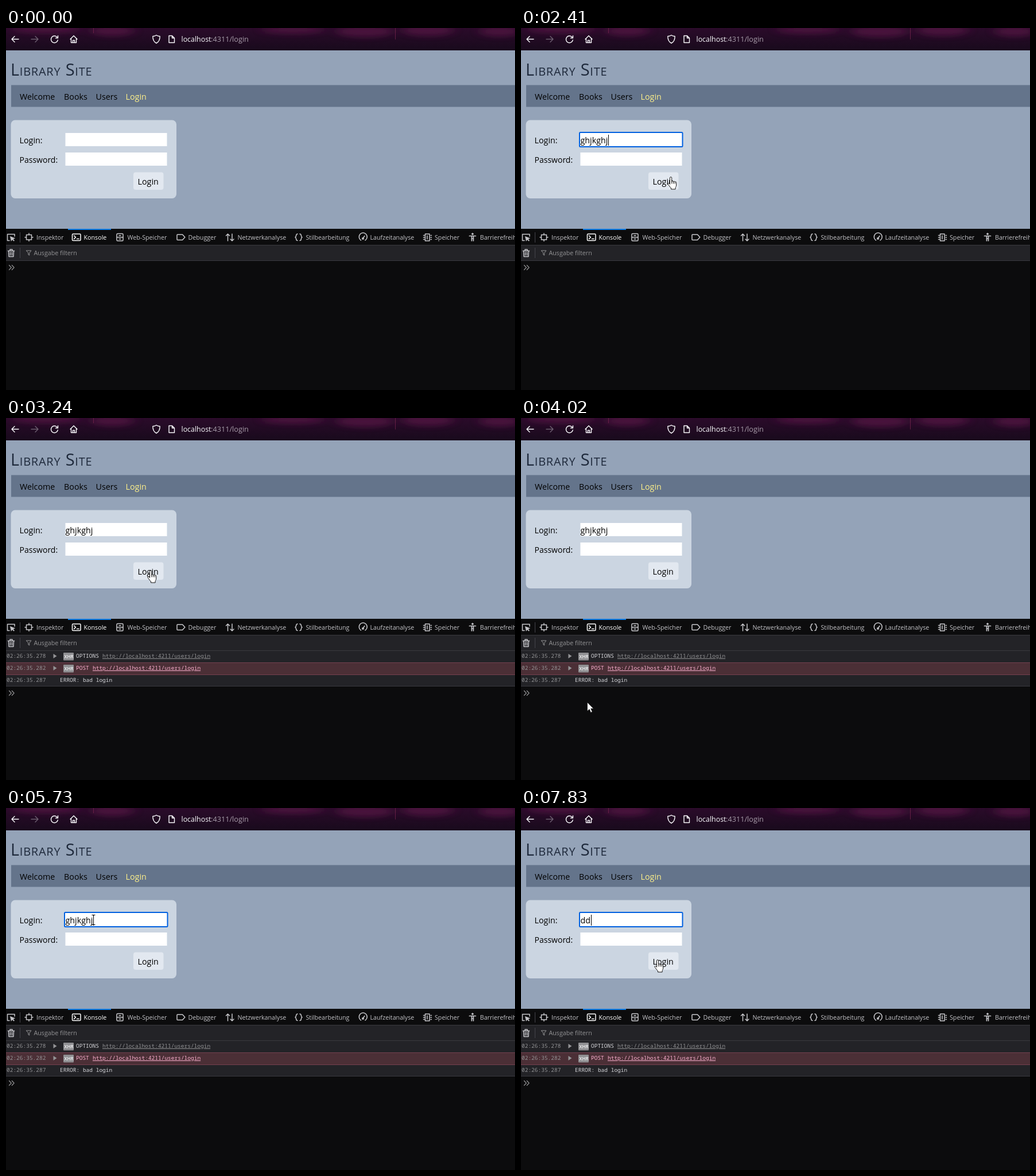
Recreate the animation shown at these times as an HTML page. Size 887x631 px, loop 8 s.

```html
<!DOCTYPE html>
<html lang="de">
<head>
<meta charset="utf-8">
<title>Library Site</title>
<style>
  html, body { margin: 0; width: 100%; height: 100%; overflow: hidden; background: #0c0c0d; }
  svg { display: block; }
  text { white-space: pre; font-family: "Open Sans", "Noto Sans", sans-serif; }
  .page { font-size: 14.3px; }
  .title { font-size: 29px; font-variant: small-caps; letter-spacing: .75px; fill: #1e293b; }
  .url { font-size: 12.4px; fill: #fbfbfe; }
  .tool { font-size: 10.7px; fill: #c4c4c8; }
  .log text { font: 9.5px "Noto Sans Mono", "DejaVu Sans Mono", monospace; fill: #d7d7db; }
  .log .dim { fill: #939395; }
  .log .bad { fill: #ffb3d2; }
  .log .xhr { font: 600 8px "Open Sans", sans-serif; fill: #f2f2f4; }
  .link { text-decoration: underline; }
  .icon { fill: none; stroke: #c8c8cc; stroke-width: 1.5; stroke-linecap: round; stroke-linejoin: round; }
  .nav { fill: none; stroke: #fbfbfe; stroke-width: 1.4; stroke-linecap: round; stroke-linejoin: round; }
</style>
</head>
<body>
<svg width="887" height="631" viewBox="0 0 887 631">
  <defs>
    <linearGradient id="night" x2="0" y2="1">
      <stop offset="0" stop-color="#2b0b2a"/>
      <stop offset="1" stop-color="#180a1c"/>
    </linearGradient>
    <filter id="soft" x="-50%" y="-100%" width="200%" height="300%"><feGaussianBlur stdDeviation="9 5"/></filter>
    <clipPath id="bar"><rect width="887" height="39"/></clipPath>
  </defs>

  <!-- browser bar -->
  <g clip-path="url(#bar)">
    <rect width="887" height="39" fill="url(#night)"/>
    <g filter="url(#soft)" fill="#571344" opacity=".7">
      <ellipse cx="70" cy="2" rx="60" ry="7"/>
      <ellipse cx="185" cy="5" rx="38" ry="9"/>
      <ellipse cx="500" cy="3" rx="55" ry="7"/>
      <ellipse cx="625" cy="6" rx="50" ry="10"/>
      <ellipse cx="735" cy="4" rx="45" ry="10"/>
      <ellipse cx="860" cy="6" rx="35" ry="9"/>
    </g>
    <path d="M152.5 0V9M678.500 0V20" stroke="#8a2c56" opacity=".6"/>
  </g>
  <g class="nav">
    <path d="M22 19.500H10M15 14.500l-5 5 5 5"/>
    <path d="M44 19.500H56M51 14.500l5 5-5 5" stroke="#6d5f70"/>
    <path d="M89.500 16.500A6 6 0 1 0 90.300 21M90.500 13.500V17.500H86.500"/>
    <path d="M112 19.500l6-6 6 6M113.500 18.500V25.500H122.500V18.500M116.500 25.500V21.500h3V25.500"/>
    <path d="M262 12.500c2 1.400 4 1.800 6.200 2 0 5.500-1.200 9.500-6.200 12-5-2.500-6.200-6.500-6.200-12 2.200-.2 4.200-.6 6.200-2z"/>
    <path d="M284 13.500h5.500l4 4V25.500h-9.500zM289.500 13.500v4h4"/>
  </g>
  <text class="url" x="305.500" y="24">localhost</text>
  <text class="url" x="357" y="24" style="fill:#a79ca9;font-size:12.700px">:4311/login</text>

  <!-- page -->
  <rect y="39" width="887" height="312" fill="#94a3b8"/>
  <text class="title" x="8" y="83">Library Site</text>
  <rect x="9" y="99.500" width="878" height="38" fill="#64748b"/>
  <g class="page">
    <text x="24" y="125">Welcome</text>
    <text x="101" y="125">Books</text>
    <text x="156.500" y="125">Users</text>
    <text x="208.500" y="125" fill="#fef08a">Login</text>
    <rect x="8.500" y="160.500" width="288.500" height="136.500" rx="7.500" fill="#cbd5e1"/>
    <text x="23.500" y="201">Login:</text>
    <text x="23.500" y="235" style="font-size:14px">Password:</text>
    <rect x="103.500" y="183" width="177" height="23" fill="#fff"/>
    <rect x="103.500" y="217" width="177" height="23" fill="#fff"/>
    <rect id="ring" x="102" y="182" width="179.500" height="25" rx="1.500" fill="#fff" stroke="#0060df" stroke-width="2"/>
    <rect id="mark" x="103.500" y="185" height="20" fill="#0078d7"/>
    <text id="entry" x="103.500" y="201"></text>
    <rect id="caret" y="186" width="1" height="19"/>
    <rect x="222" y="251.500" width="52.500" height="30.500" rx="4" fill="#e2e8f0"/>
    <text x="229.500" y="273">Login</text>
  </g>

  <!-- developer tools -->
  <rect y="350" width="887" height="281" fill="#0c0c0d"/>
  <rect y="379" width="887" height="26" fill="#232327"/>
  <path d="M0 378.500H887M0 405.500H887" stroke="#3a3a3f"/>
  <path d="M24.500 356V374M24.500 383V401" stroke="#45454a"/>
  <rect x="108" y="350" width="75" height="2" fill="#0a7ce8"/>
  <g class="icon">
    <path d="M6 370.500H2.500V359.500H15V363"/>
    <path d="M7.500 363.500l8 3-3.200 1.300 2.200 2.700-1 .9-2.400-2.700-1.800 2.400z" fill="#c8c8cc" stroke-width=".6"/>
    <path d="M35.500 360.500h9v8.500h-9zM40 358v2M40 369.500v2M33 364.800h2M45 364.800h2"/>
    <path d="M117 359h11.500a1.500 1.500 0 0 1 1.500 1.500v8.500a1.500 1.500 0 0 1-1.500 1.500H117a1.500 1.500 0 0 1-1.500-1.500v-8.500a1.500 1.500 0 0 1 1.500-1.500zM118.500 362l3 2.800-3 2.800M123.500 367.500h3.500" stroke="#fff"/>
    <path d="M194.500 358.500h8a1.500 1.500 0 0 1 1.500 1.500v9.500a1.500 1.500 0 0 1-1.500 1.500h-8a1.500 1.500 0 0 1-1.500-1.500V360a1.500 1.500 0 0 1 1.500-1.500zM193 364.800h11M197 361.700h3M197 367.800h3"/>
    <path d="M299 360h8.500l4.300 4.800-4.300 4.700h-8.500a1 1 0 0 1-1-1v-7.500a1 1 0 0 1 1-1z"/>
    <path d="M386.500 371V359M383.500 362l3-3 3 3M394 359v12M391 368l3 3 3-3"/>
    <path d="M508 359c-4 0-1 5-4 5.800 3 .8 0 5.700 4 5.700M512 359c4 0 1 5 4 5.800-3 .8 0 5.700-4 5.700"/>
    <path d="M618.500 370a7 7 0 1 1 7.500 0M622 366.500l3-4"/>
    <circle cx="622" cy="367" r="1.300"/>
    <path d="M730.500 359h7.500v12h-7.500zM727.500 361.500h1.500M727.500 365h1.500M727.500 368.500h1.500M740 361.500h1.500M740 365h1.500M740 368.500h1.500M734 362v6"/>
    <path d="M807.500 362.500h11M811.500 363v8M814.500 363v8M811.500 367h3" stroke-width="1.700"/>
    <circle cx="813" cy="359" r="1.300" fill="#c8c8cc" stroke-width="1"/>
    <path d="M3.500 388.500H14.500M7 388v-2h4v2M4.500 389l.6 9.500h7.800l.6-9.500M7.500 391v5M10.500 391v5"/>
    <path d="M35.500 388h8.500l-3.300 4.200v4l-1.900-1.200v-2.800z" stroke="#939395" stroke-width="1"/>
    <path id="prompt" d="M5.500 413.500l3.800 4-3.800 4M10.300 413.500l3.800 4-3.800 4" stroke="#939395" stroke-width="1.200"/>
  </g>
  <g id="tabs"></g>
  <text class="tool" x="48.500" y="396" style="fill:#939395">Ausgabe filtern</text>

  <g id="log" class="log">
    <rect y="406" width="887" height="61" fill="#232327"/>
    <rect y="426" width="887" height="21" fill="#4b2f36"/>
    <path d="M0 426.500H887M0 447.500H887" stroke="#74404f"/>
    <path d="M0 467.500H887" stroke="#3a3a3f"/>
    <path d="M82.500 411l6 4-6 4zM82.500 432l6 4-6 4z" fill="#939395"/>
    <rect x="100" y="409" width="18" height="13.500" rx="1" fill="#8f8f92"/>
    <rect x="100" y="430" width="18" height="13.500" rx="1" fill="#8f8f92"/>
    <text class="xhr" x="101.500" y="418.700">XHR</text>
    <text class="xhr" x="101.500" y="439.700">XHR</text>
    <text class="dim" x="1" y="418">02:26:35.278</text>
    <text x="122" y="418">OPTIONS</text>
    <text class="dim link" x="168" y="418">http://localhost:4211/users/login</text>
    <text class="dim" x="1" y="439">02:26:35.282</text>
    <text class="bad" x="122" y="439">POST</text>
    <text class="bad link" x="151" y="439">http://localhost:4211/users/login</text>
    <text class="dim" x="1" y="460">02:26:35.287</text>
    <text x="94" y="460">ERROR: bad login</text>
  </g>

  <!-- pointers -->
  <path id="arrow" d="M0 0V15.500l3.600-3.300 2.500 5.700 2.700-1.200-2.500-5.500H11z" fill="#fff" stroke="#111" stroke-width=".8"/>
  <path id="beam" d="M-3 -8.500H-1L0 -7.500 1 -8.500H3M0 -7.500V7.500M-3 8.500H-1L0 7.500 1 8.500H3" fill="none" stroke="#111" stroke-width="1.100"/>
  <g id="hand" stroke="#111" stroke-linejoin="round" stroke-linecap="round">
    <path fill="#fff" d="M4.500 13V2.300a1.600 1.600 0 0 1 3.200 0V8.500a1.500 1.500 0 0 1 2.800.4 1.500 1.500 0 0 1 2.700.6 1.400 1.400 0 0 1 2.500 1V15c0 2-1.200 3.200-1.600 4.500V22H6.500V20C5 18.500 3 16 1.200 13.200c-.8-1.400.9-2.500 2-1.300z"/>
    <path fill="none" d="M7.700 8.500v3.500M10.500 9v3M13.200 9.700v2.500"/>
  </g>
</svg>
<script>
const LOOP = 8000;
const $ = id => document.getElementById(id);

// Each row: start time, then the values held until the next row.
const moves = [
  [0, ''],
  [260, 'arrow', 398, 555], [400, 'arrow', 360, 510], [540, 'arrow', 315, 445],
  [680, 'arrow', 262, 385], [820, 'arrow', 216, 325], [970, 'arrow', 190, 270],
  [1110, 'beam', 174, 224], [1260, 'beam', 168, 199],
  [2030, 'beam', 182, 203], [2160, 'beam', 212, 225],
  [2280, 'hand', 242, 252], [2410, 'hand', 255, 259],
  [2560, 'hand', 251, 262], [2700, 'hand', 247, 264], [2840, 'hand', 246, 265],
  [3390, 'arrow', 222, 345], [3510, 'arrow', 172, 450], [3640, 'arrow', 134, 520],
  [3770, 'arrow', 118, 537], [3900, 'arrow', 114, 520], [4020, 'arrow', 115.5, 495.5],
  [4170, 'arrow', 107, 473], [4290, 'arrow', 112, 455], [4440, 'arrow', 126, 415],
  [4580, 'arrow', 146, 365], [4730, 'arrow', 165, 315], [4870, 'arrow', 177, 270],
  [5020, 'beam', 180, 232], [5160, 'beam', 174, 212], [5310, 'beam', 165, 199],
  [5590, 'beam', 157, 197], [5730, 'beam', 152.5, 195], [5850, 'beam', 100, 194],
  [6130, 'beam', 140, 190], [6270, 'beam', 200, 186], [6400, 'beam', 238, 185],
  [7230, 'arrow', 345, 196], [7380, 'arrow', 440, 225], [7530, 'arrow', 390, 246],
  [7680, 'hand', 290, 258], [7830, 'hand', 232, 264]
];
const entries = [
  [0, ''], [1510, 'g'], [1640, 'ghj'], [1770, 'ghjkg'], [1900, 'ghjkghj'],
  [6930, 'd'], [7080, 'dd']
];
const focus = [[0, false], [1380, true], [2840, false], [5460, true]];
const marks = [[0, false], [5850, true], [6930, false]];
const logs = [[0, false], [3240, true]];

const tabs = [
  [53, 'Inspektor'], [135.5, 'Konsole'], [211.5, 'Web-Speicher'], [317.5, 'Debugger'],
  [403.5, 'Netzwerkanalyse'], [522.5, 'Stilbearbeitung'], [634.5, 'Laufzeitanalyse'],
  [747, 'Speicher'], [826, 'Barrierefreiheit']
];
for (const [x, label] of tabs) {
  const tab = document.createElementNS('http://www.w3.org/2000/svg', 'text');
  tab.setAttribute('class', 'tool');
  tab.setAttribute('x', x);
  tab.setAttribute('y', 369);
  if (label === 'Konsole') tab.style.fill = '#fff';
  tab.textContent = label;
  $('tabs').append(tab);
}

function at(rows, t) {
  let now = rows[0];
  for (const row of rows) if (row[0] <= t) now = row;
  return now.slice(1);
}

function show(id, on) {
  $(id).style.display = on ? '' : 'none';
}

function draw(t) {
  const [kind, x, y] = at(moves, t);
  for (const id of ['arrow', 'beam', 'hand']) show(id, id === kind);
  if (kind) $(kind).setAttribute('transform', `translate(${x} ${y})`);

  const [word] = at(entries, t);
  const [focused] = at(focus, t);
  const [marked] = at(marks, t);
  const entry = $('entry');
  if (entry.textContent !== word) entry.textContent = word;
  const width = word ? entry.getComputedTextLength() : 0;
  entry.style.fill = marked ? '#fff' : '#000';
  $('mark').setAttribute('width', width);
  $('caret').setAttribute('x', Math.round(104 + width));
  show('ring', focused);
  show('mark', marked);
  show('caret', focused && !marked);

  const [logged] = at(logs, t);
  show('log', logged);
  $('prompt').setAttribute('transform', `translate(0 ${logged ? 62 : 0})`);
}

const start = performance.now();
function tick() {
  draw((performance.now() - start) % LOOP);
  requestAnimationFrame(tick);
}
tick();
</script>
</body>
</html>
```
